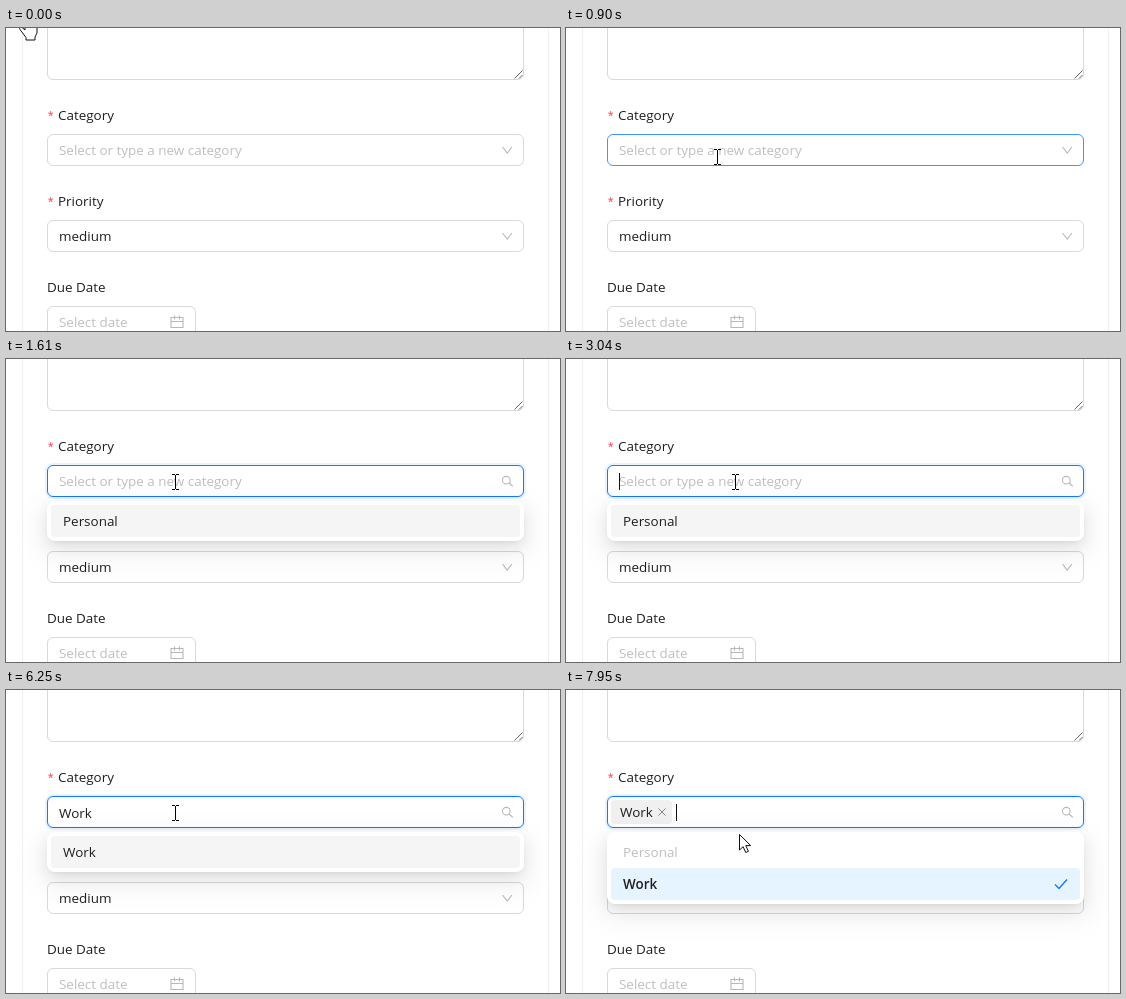
Animation of 554 by 303 pixels, one loop 8 s. Source, as an HTML page:

```html
<!DOCTYPE html>
<html lang="en">
<head>
<meta charset="utf-8">
<title>Category select</title>
<style>
  html, body { margin: 0; width: 100%; height: 100%; overflow: hidden; background: #fff; }
  body { position: relative; font: 13.45px/22px "Open Sans", "Noto Sans", sans-serif; color: #1f1f1f; }
  svg { position: absolute; left: 0; top: 0; display: block; width: 554px; height: 303px; }
  text { fill: #1f1f1f; }
  .hint { fill: #bfbfbf; }
  .star { fill: #ff4d4f; font: 14px "Liberation Mono", monospace; }
  .box { fill: #fff; stroke: #d9d9d9; }
  .icon { fill: none; stroke: #b8b8b8; stroke-width: 1.1; }
  #drop {
    position: absolute; left: 41px; top: 142px; width: 469px; padding: 4px;
    border-radius: 8px; background: #fff; transform-origin: 0 0;
    box-shadow: 0 6px 16px rgba(0,0,0,.08), 0 3px 6px -4px rgba(0,0,0,.12), 0 9px 28px 8px rgba(0,0,0,.05);
  }
  .option { height: 22px; padding: 5px 12px; border-radius: 4px; }
  .active { background: #f5f5f5; }
  .disabled { color: #bfbfbf; }
  .selected { background: #e6f4ff; font-weight: 600; }
  .pointer { fill: #fff; stroke: #111; stroke-linejoin: round; }
</style>
</head>
<body>
<svg viewBox="0 0 554 303">
  <path d="M16.5 0V303M542.5 0V303" stroke="#f0f0f0"/>
  <rect class="box" x="41.5" y="-40.5" width="476" height="92" rx="5.5"/>
  <path d="M508.5 50.5l8-8M513 50.5l3.5-3.5" stroke="#666"/>

  <text class="star" x="40.5" y="94">*</text>
  <text x="52" y="92">Category</text>
  <rect id="ring" x="40" y="105" width="479" height="34" rx="7" fill="none" stroke="#0591ff" stroke-opacity=".1" stroke-width="2"/>
  <rect id="field" class="box" x="41.5" y="106.5" width="476" height="31" rx="5.5"/>
  <text id="hint" class="hint" x="53" y="127">Select or type a new category</text>
  <text id="typed" x="53" y="128"></text>
  <g id="tag">
    <rect x="45" y="110" width="61" height="24" rx="4" fill="#f0f0f0"/>
    <text x="54" y="127">Work</text>
    <path d="M92.5 118.5l7 7m0-7l-7 7" stroke="#858585"/>
  </g>
  <rect id="caret" y="114" width="1" height="17" fill="#111"/>
  <path id="chevron" class="icon" d="M496.5 119l4.700 6 4.700-6"/>
  <g id="search" class="icon"><circle cx="500.300" cy="121.200" r="3.800"/><path d="M503.200 124l3.600 3.400"/></g>

  <text class="star" x="40.5" y="180">*</text>
  <text x="52" y="178">Priority</text>
  <rect class="box" x="41.5" y="192.5" width="476" height="31" rx="5.5"/>
  <text x="53" y="213">medium</text>
  <path class="icon" d="M496.5 205l4.700 6 4.700-6"/>

  <text x="41" y="264">Due Date</text>
  <rect class="box" x="41.5" y="278.500" width="148" height="31" rx="5.5"/>
  <text class="hint" x="53" y="299">Select date</text>
  <path class="icon" d="M165 289.500h12v10h-12zM165 293.500h12M168.500 287.500v4M173.500 287.500v4"/>
</svg>

<div id="drop">
  <div id="first" class="option"></div>
  <div id="second" class="option selected">Work</div>
</div>

<svg viewBox="0 0 554 303">
  <path id="check" d="M489 194.500l4 4 8-9" fill="none" stroke="#1677ff" stroke-width="1.400"/>
  <path id="hand" class="pointer" d="M-3-8v10l-3-2.500c-2-1-3 .5-2 2l6 8v2.500h9v-3l2-4v-7c0-2-2.500-2-2.500 0v-2c0-2-3-2-3 0v-1c0-2-3-2-3 0v-5z"/>
  <path id="arrow" class="pointer" d="M.5.5v15.500l3.600-3.300 2.600 5.800 2.700-1.200-2.600-5.700h4.900z"/>
  <path id="beam" d="M-3-8h3v1h1v-1h3v1h-3v14h3v1h-3v-1h-1v1h-3v-1h3v-14h-3z" fill="#000"/>
</svg>

<script>
const LOOP = 8000, FOCUS = 990, PICK = 6610;
const el = Object.fromEntries([...document.querySelectorAll("[id]")].map(node => [node.id, node]));

// [time, shape, x, y]: each pose holds until the next
const poses = [
  [0, "hand", 22, 0], [180, "hand", 27, 8], [270, "beam", 67, 38], [360, "arrow", 112, 84],
  [450, "beam", 140, 117], [540, "beam", 148, 131], [630, "beam", 150, 131],
  [720, "beam", 151, 131], [810, "beam", 151, 130], [900, "beam", 151, 129],
  [1350, "beam", 162, 125], [1430, "beam", 169, 123],
  [7680, "beam", 172, 125], [7950, "arrow", 173, 144]
];
// [time, text, caret x]
const typing = [[0, "", 53], [4290, "W", 65], [4640, "Wo", 72], [4820, "Wor", 77], [5720, "Work", 84], [PICK, "", 110]];
const blinks = [1080, 1610, 2060, 2590, 3040, 3570, 4110, 5360, 5720, 6250, 6790, 7240, 7770];

const clamp = v => Math.max(0, Math.min(1, v));
const latest = (list, t) => list.filter(item => item[0] <= t).pop();
const show = (node, on) => node.style.display = on ? "" : "none";
const mix = (a, b, k) => `rgb(${a.map((v, i) => Math.round(v + (b[i] - v) * k))})`;
const GREY = [217, 217, 217], HOVER = [64, 150, 255], BLUE = [22, 119, 255];

function draw(t) {
  const step = Math.floor(t / 90) * 90;
  const focused = t >= FOCUS, picked = t >= PICK;

  const focus = clamp((step - 1060) / 110);
  el.field.style.stroke = focused ? mix(HOVER, BLUE, focus) : mix(GREY, HOVER, clamp((step - 380) / 200));
  el.ring.style.opacity = focus;
  show(el.chevron, !focused);
  show(el.search, focused);

  const [, text, caretX] = latest(typing, t);
  el.typed.textContent = text;
  show(el.hint, !text && !picked);
  show(el.tag, picked);
  el.caret.setAttribute("x", caretX);
  show(el.caret, blinks.filter(time => time <= t).length % 2);

  const open = clamp((step - 940) / 140);
  show(el.drop, focused);
  el.drop.style.opacity = open;
  el.drop.style.transform = `scaleY(${0.8 + 0.2 * open})`;
  el.first.textContent = text || "Personal";
  el.first.className = "option " + (picked ? "disabled" : "active");
  show(el.second, picked);
  show(el.check, picked);

  const [, shape, x, y] = latest(poses, t);
  for (const name of ["hand", "arrow", "beam"]) show(el[name], name === shape);
  el[shape].setAttribute("transform", `translate(${x} ${y})`);
}

const start = performance.now();
function tick() {
  draw((performance.now() - start) % LOOP);
  requestAnimationFrame(tick);
}
tick();
</script>
</body>
</html>
```
